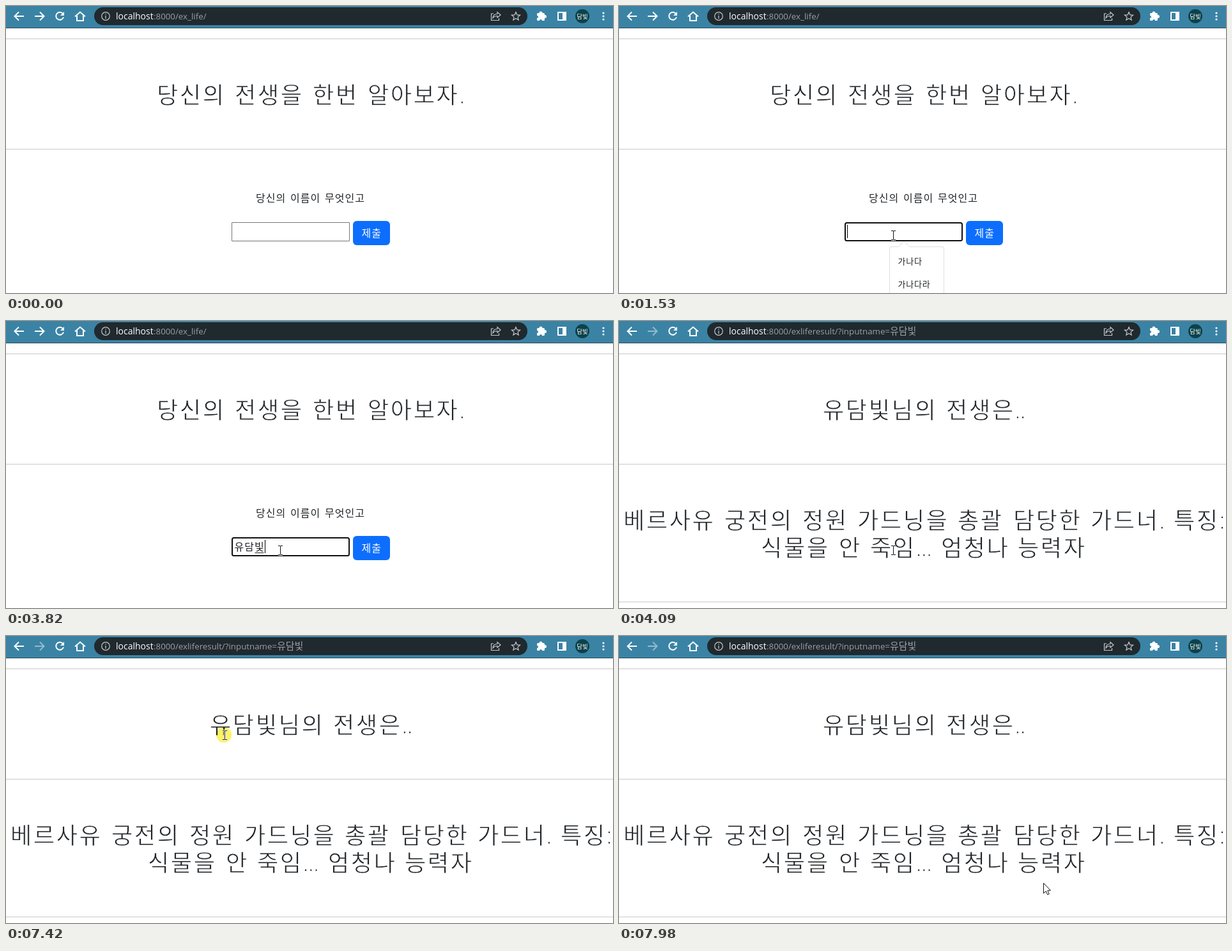
Write an HTML page that moves like this. It is 950x450 px and loops after 8 s.

```html
<!DOCTYPE html>
<html lang="ko">
<head>
<meta charset="utf-8">
<title>전생 알아보기</title>
<style>
  html, body { margin: 0; width: 100%; height: 100%; overflow: hidden; background: #fff; }
  svg { display: block; width: 950px; height: 450px; }
  text { font-family: "Noto Sans CJK KR", "Noto Sans CJK", sans-serif; fill: #212529; white-space: pre; }
  /* The white outline slims the strokes to a semilight weight. */
  .head { font-size: 36.25px; font-weight: 300; letter-spacing: 2.5px; stroke: #fff; stroke-width: .8; }
  .dots { font-family: "Open Sans", sans-serif; letter-spacing: -.4px; }
  .body { font-size: 16px; letter-spacing: 1px; }
  .item { font-size: 13px; letter-spacing: .8px; }
  .url { font-family: "Open Sans", "Noto Sans CJK KR", sans-serif; font-size: 13.3px; fill: #9aa0a6; }
  .host { font-size: 14px; fill: #fff; }
  .line { fill: none; stroke: #fff; stroke-width: 2; }
  .thin { fill: none; stroke: #c4c8ca; stroke-width: 1.2; }
  .rule { stroke: #c8c9ca; }
  #glow { mix-blend-mode: multiply; }
</style>
</head>
<body>
<svg viewBox="0 0 950 450">
  <rect width="950" height="450" fill="#fff"/>

  <g id="toolbar">
    <rect width="950" height="35" fill="#3a83a5"/>
    <path d="M0 34.5H950" stroke="#2f4c59"/>
    <rect x="138" y="2" width="678" height="28" rx="14" fill="#20292e"/>
    <path class="line" d="M28 16H14M20 9.5 13.5 16 20 22.5"/>
    <path id="forward" class="line" d="M45 16H59M53 9.5 59.5 16 53 22.5"/>
    <path class="line" d="M89 12A6 6 0 1 0 90 17.5"/>
    <path d="M91 9V15H85Z" fill="#fff"/>
    <path class="line" d="M108 16.5 116 9.5 124 16.5M111 14.5V23H121V14.5"/>
    <circle class="thin" cx="156" cy="16" r="6.3"/>
    <path class="thin" d="M156 15V20M156 12V13.5"/>
    <text class="url" y="21"><tspan class="host" x="172">localhost</tspan><tspan id="path" x="231"></tspan><tspan id="query" x="424" font-size="15"></tspan></text>
    <path class="thin" d="M763 12H759.5V22.5H771.5V19M762 19C762.5 14 765.5 12.5 769 12.5V9.5L774 14 769 18.3V15.5C766 15.5 764 16.5 762 19Z"/>
    <path class="thin" d="M798 9.5 799.9 13.9 804.6 14.3 801 17.4 802.1 22 798 19.5 793.9 22 795 17.4 791.4 14.3 796.1 13.9Z"/>
    <g fill="#fff">
      <rect x="831" y="11" width="12" height="12" rx="1.5"/>
      <circle cx="837" cy="11" r="2.5"/><circle cx="843.5" cy="16.5" r="2.5"/>
      <g fill="#3a83a5"><circle cx="831" cy="17" r="2"/><circle cx="837" cy="23" r="2"/></g>
      <circle cx="935" cy="11" r="1.6"/><circle cx="935" cy="16" r="1.6"/><circle cx="935" cy="21" r="1.6"/>
      <path d="M863 9H877V23H863ZM865 11V21H871V11Z" fill-rule="evenodd"/>
    </g>
    <circle cx="902" cy="16" r="11" fill="#0c424b"/>
    <text x="902" y="19.5" text-anchor="middle" font-size="9.5" style="fill:#fff">담빛</text>
  </g>

  <path class="rule" d="M0 51.5H950M0 224.5H950"/>

  <g id="form">
    <g id="question"></g>
    <text class="body" x="391" y="307" word-spacing="1.4">당신의 이름이 무엇인고</text>
    <rect id="input" fill="#fff"/>
    <rect x="543" y="337" width="58" height="38" rx="6" fill="#0d6efd"/>
    <text id="submit" class="body" x="556.5" y="362" style="fill:#fff">제출</text>
    <text id="typed" class="body" x="357.5" y="360"></text>
    <path id="underline" stroke="#222"/>
    <path id="caret" stroke="#000"/>
    <g id="popup">
      <path d="M423.5 460V380Q423.5 377.5 426 377.5H437L446 369.5 455 377.5H506Q508.5 377.5 508.5 380V460Z" fill="#fff" stroke="#dedede"/>
      <text class="item" x="436.5" y="404.5">가나다</text>
      <text class="item" x="436.5" y="440.5">가나다라</text>
    </g>
  </g>

  <g id="result">
    <path class="rule" d="M0 440.5H950"/>
  </g>

  <circle id="glow" r="12" fill="#fdf364"/>
  <g id="beam" fill="none">
    <path d="M-3.5-7H3.5M-3.5 7H3.5M0-7V7" stroke="#fff" stroke-width="3"/>
    <path d="M-3.5-7H-.5M.5-7H3.5M-3.5 7H-.5M.5 7H3.5M0-7V7" stroke="#111"/>
  </g>
  <path id="arrow" d="M.5.5V16.5L4.2 13 6.7 18.6 9.2 17.5 6.8 12H11.5Z" fill="#fff" stroke="#111"/>
</svg>

<script>
const $ = id => document.getElementById(id);
const show = (id, on) => $(id).style.display = on ? '' : 'none';
const set = (id, attrs) => { for (const key in attrs) $(id).setAttribute(key, attrs[key]); };

const LOOP = 8000;
const NAME = '유담빛';
const COMPOSING = ['ㅇ', '유', '윧', '유다', '유담', '유담ㅂ', '유담비', NAME];
const FOCUS = 1390, TYPE = 3120, NAVIGATE = 3960, LOADED = 4030;

// Pointer moves: start, end, number of steps
const MOVES = [[200, 790, 8], [6730, 7490, 10], [7490, 7980, 7]];
// Pointer keys: time, x, y
const TRACK = [
  [200, 607, 442], [480, 500, 390], [790, 430, 360], [6660, 430, 360], [6730, 426, 358],
  [6940, 437, 280], [7414, 343, 156], [7490, 329, 125], [7980, 664, 387]
];
const INPUT_BOX = [353, 339, 538, 369];
const TEXT_BOXES = [[318, 115, 638, 162], [6, 290, 950, 333], [222, 333, 733, 376]];
const inBox = ([x, y], [left, top, right, bottom]) =>
  x >= left && x <= right && y >= top && y <= bottom;

function addHeading(parent, y, words) {
  const markup = words.map(([x, word]) =>
    `<text class="head" x="${x}" y="${y}">${word.replace(/[.:]+/, '<tspan class="dots">$&</tspan>')}</text>`);
  $(parent).insertAdjacentHTML('beforeend', markup.join(''));
}
addHeading('question', 153, [[236, '당신의'], [358, '전생을'], [480, '한번'], [566, '알아보자.']]);
addHeading('result', 153, [[319, NAME + '님의'], [512, '전생은..']]);
addHeading('result', 326, [[7, '베르사유'], [165, '궁전의'], [287, '정원'], [373, '가드닝을'],
  [530, '총괄'], [617, '담당한'], [738, '가드너.'], [868, '특징:']]);
addHeading('result', 369, [[222, '식물을'], [344, '안'], [393, '죽임...'], [504, '엄청나'], [624, '능력자']]);

// Holds the pointer still between its steps.
function stepped(t) {
  const move = MOVES.find(([start, end]) => t >= start && t < end);
  if (!move) return t;
  const [start, end, count] = move, step = (end - start) / count;
  return start + Math.floor((t - start) / step) * step;
}

function pointerAt(t) {
  const next = TRACK.findIndex(key => key[0] > t);
  if (next < 0) return TRACK.at(-1).slice(1);
  if (next === 0) return TRACK[0].slice(1);
  const [t0, x0, y0] = TRACK[next - 1], [t1, x1, y1] = TRACK[next];
  const k = (t - t0) / (t1 - t0);
  return [Math.round(x0 + (x1 - x0) * k), Math.round(y0 + (y1 - y0) * k)];
}

function drawPointer(t, pos) {
  const boxes = t < LOADED ? [INPUT_BOX] : TEXT_BOXES;
  const overText = boxes.some(box => inBox(pos, box));
  const [x, y] = pos;
  show('beam', overText);
  show('arrow', t >= 200 && !overText);
  show('glow', t >= 7350 && t < 7560);
  set('beam', { transform: `translate(${x - .5} ${y - .5})` });
  set('arrow', { transform: `translate(${x} ${y})` });
  set('glow', { cx: x - 2, cy: y - 1 });
}

function drawInput(t, hovered) {
  const focused = t >= FOCUS;
  const inset = focused ? 1 : .5;
  set('input', {
    x: 353 + inset, y: 339 + inset, width: 185 - 2 * inset, height: 30 - 2 * inset,
    rx: focused ? 2.5 : .5,
    stroke: focused ? '#101010' : hovered ? '#4f4f4f' : '#767676',
    'stroke-width': 2 * inset
  });
  $('submit').style.fontWeight = focused ? 500 : 400;

  const stage = Math.min(COMPOSING.length - 1, Math.floor((t - TYPE) / 88));
  const text = t < TYPE ? '' : COMPOSING[stage];
  const end = 357.5 + text.length * 16;
  $('typed').textContent = text;
  show('underline', text);
  set('underline', { d: `M${end - 16} 363.5H${end - 2}` });
  set('caret', { d: `M${end} 343V364` });
  show('caret', focused && (text || (t < 1990 || t >= 2520) && t < 3050));
}

function drawPopup(t) {
  const closing = t >= TYPE;
  const opacity = closing
    ? (t < 3190 ? .5 : t < 3270 ? .12 : 0)
    : (t < 1460 ? 0 : t < 1530 ? .5 : 1);
  const transform = closing ? 'translate(446 371) scale(.97) translate(-446 -369)' : '';
  set('popup', { opacity, transform });
}

function draw(t) {
  const loaded = t >= LOADED, navigated = t >= NAVIGATE;
  $('path').textContent = navigated ? ':8000/exliferesult/?inputname=' : ':8000/ex_life/';
  $('query').textContent = navigated ? NAME : '';
  set('forward', { opacity: navigated ? .45 : 1 });
  show('form', !loaded);
  show('result', loaded);

  const pos = pointerAt(stepped(t));
  if (!loaded) {
    drawInput(t, t >= 200 && inBox(pos, INPUT_BOX));
    drawPopup(t);
  }
  drawPointer(t, pos);
}

function frame() {
  draw(performance.now() % LOOP);
  requestAnimationFrame(frame);
}
frame();
</script>
</body>
</html>
```
